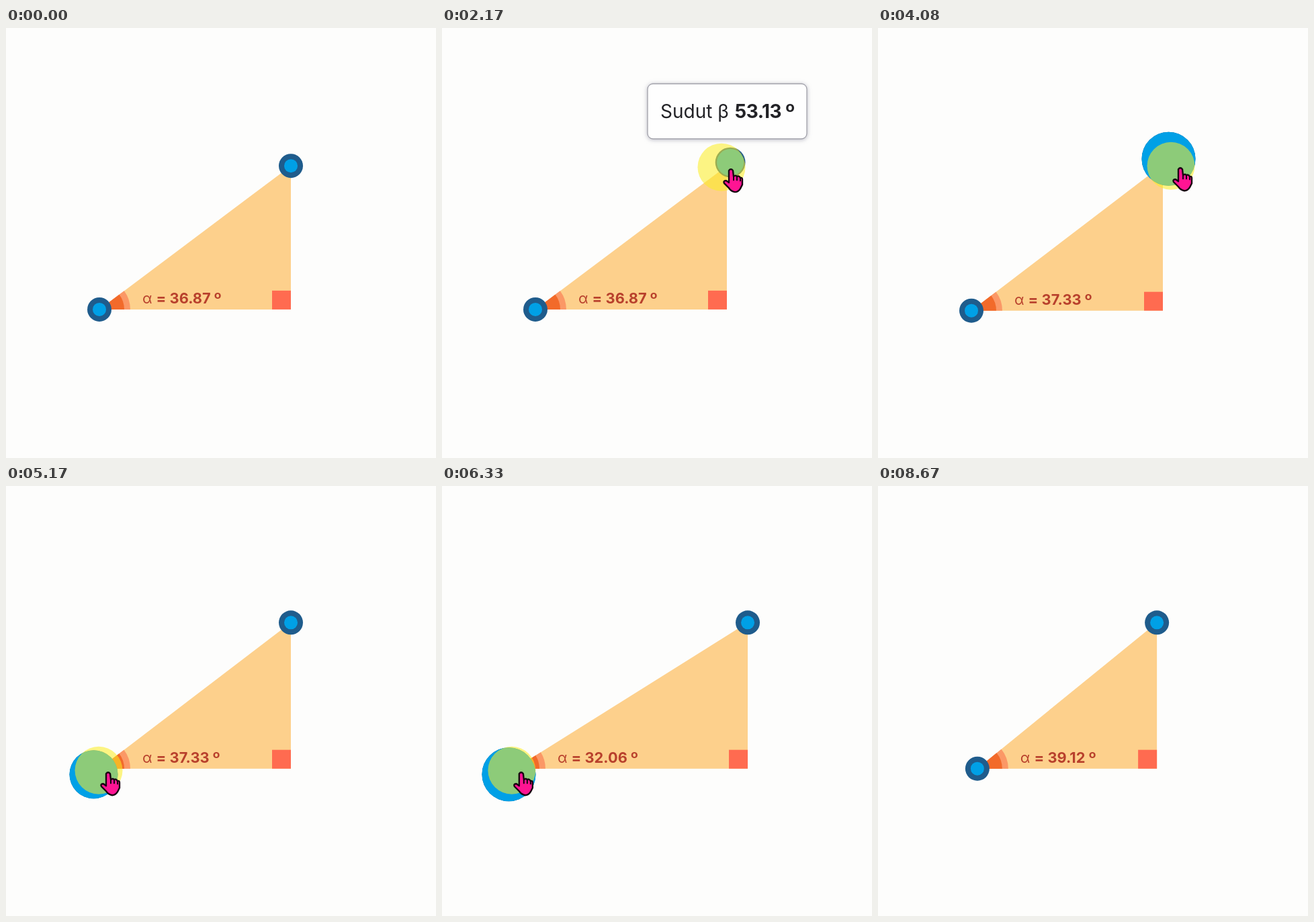
These frames come from a looping animation (640x640 px, 8.91 s). An HTML page:

```html
<!DOCTYPE html>
<html lang="id">
<head>
<meta charset="utf-8">
<title>Sudut segitiga</title>
<style>
  html, body { margin: 0; width: 100%; height: 100%; overflow: hidden; background: #fdfdfc; }
  svg { display: block; width: 100vw; height: 100vh; font-family: Inter, "Open Sans", sans-serif; }
  .bold { font-weight: 700; }
  .ring { fill: #1f5c8c; }
  .core { fill: #00a0e6; }
  #label { font-size: 21.8px; fill: #b8402c; }
  #tip { animation: tip 8910ms linear infinite; }
  #tip rect { fill: #fefefe; stroke: #a2a2aa; stroke-width: 1.3; filter: drop-shadow(0 1px 3px #77779080); }
  #tip text { font-size: 28px; fill: #222226; }
  @keyframes tip {
    0%, 17.6% { opacity: 0; }
    19.2%, 24.9% { opacity: 1; }
    25.8%, 100% { opacity: 0; }
  }
</style>
</head>
<body>
<svg viewBox="0 0 640 640">
  <path id="triangle" fill="#fdd08c"/>
  <rect id="square" width="28" height="28" fill="#ff6b50"/>
  <path id="outerArc" fill="#fb9866"/>
  <path id="innerArc" fill="#f26a2a"/>
  <text id="label">α <tspan class="bold">= <tspan id="degrees">36.87</tspan> º</tspan></text>
  <g id="topKnob"><circle class="ring"/><circle class="core"/></g>
  <g id="leftKnob"><circle class="ring"/><circle class="core"/></g>
  <g id="tip">
    <rect x="306" y="83" width="237" height="82" rx="8"/>
    <text x="325" y="134">Sudut β <tspan class="bold" dx="1" letter-spacing="-.5">53.13 º</tspan></text>
  </g>
  <g id="cursor">
    <circle cx="-14" cy="-3" r="35.5" fill="#fbee24" fill-opacity=".56"/>
    <path d="M-3 2Q0-2 3 2L4 11Q7 8 9 11Q12 9 14 13Q17 12 17 15V23L14 29Q11 34 6 34Q0 33-3 28L-10 21Q-12 17-7 17L-3 20Z"
      fill="#ff1493" stroke="#180410" stroke-width="2.4" stroke-linejoin="round"/>
    <path d="M4 11V17M9 11V17M14 13V18" stroke="#180410" stroke-width="2"/>
  </g>
</svg>
<script>
const LOOP = 8910, CENTER_X = 281.5, CENTER_Y = 312;
const el = id => document.getElementById(id);
const set = (node, attrs) => {
  for (const name in attrs) node.setAttribute(name, attrs[name]);
};

// A pressed knob grows, fills with its core colour and slides outwards.
function drawKnob(group, x, y, press, side) {
  const r = 18 + 22 * press;
  const shift = 8.5 * Math.min(1, press * 3) * side;
  set(group, { transform: `translate(${x + shift} ${y - shift})` });
  set(group.children[0], { r });
  set(group.children[1], { r: Math.min(r, 10 + 50 * press) });
}

function sector(x, y, r, angle) {
  return `M${x} ${y}h${r}A${r} ${r} 0 0 0 ${x + r * Math.cos(angle)} ${y - r * Math.sin(angle)}Z`;
}

function draw(time) {
  const ease = (start, end) => {
    const u = Math.min(1, Math.max(0, (time - start) / (end - start)));
    return u * u * (3 - 2 * u);
  };

  // The top knob is dragged up and down, then the left one out and back.
  const h = 213.75 + 219.13 * ease(2300, 3050) - 215.53 * ease(3420, 4080);
  const w = 285 + 135.8 * ease(5230, 5830) - 153.54 * ease(6000, 6680);
  const left = CENTER_X - w / 2, right = left + w;
  const top = CENTER_Y - h / 2, bottom = top + h;
  const angle = Math.atan2(h, w);

  set(el("triangle"), { d: `M${left} ${bottom}H${right}V${top}Z` });
  set(el("square"), { x: right - 28, y: bottom - 28 });
  set(el("outerArc"), { d: sector(left, bottom, 46, angle) });
  set(el("innerArc"), { d: sector(left, bottom, 37, angle) });
  set(el("label"), { x: left + 64, y: bottom - 9 });
  el("degrees").textContent = (angle * 180 / Math.PI).toFixed(2);

  const hover = ease(2000, 2150), grab = ease(2270, 2430);
  drawKnob(el("topKnob"), right, top, .2 * hover + .8 * grab - ease(4250, 4450), 1);
  drawKnob(el("leftKnob"), left, bottom, ease(5040, 5220) - ease(6850, 7050), -1);

  // The pointer enters, crosses from knob to knob and leaves, following each drag.
  const enter = ease(420, 1600), cross = ease(4280, 5050), leave = ease(7000, 7830);
  const x = 430 * enter + 20 * grab - 298 * cross - 77 * leave + 1.1 * (left - 139);
  const y = 660 - 450 * enter + 218 * cross + 256 * leave + 1.05 * (top - 205);
  set(el("cursor"), {
    transform: `translate(${x} ${y})`,
    visibility: time > 420 && time < 7830 ? "visible" : "hidden"
  });
}

function tick() {
  draw(performance.now() % LOOP);
  requestAnimationFrame(tick);
}
tick();
</script>
</body>
</html>
```
